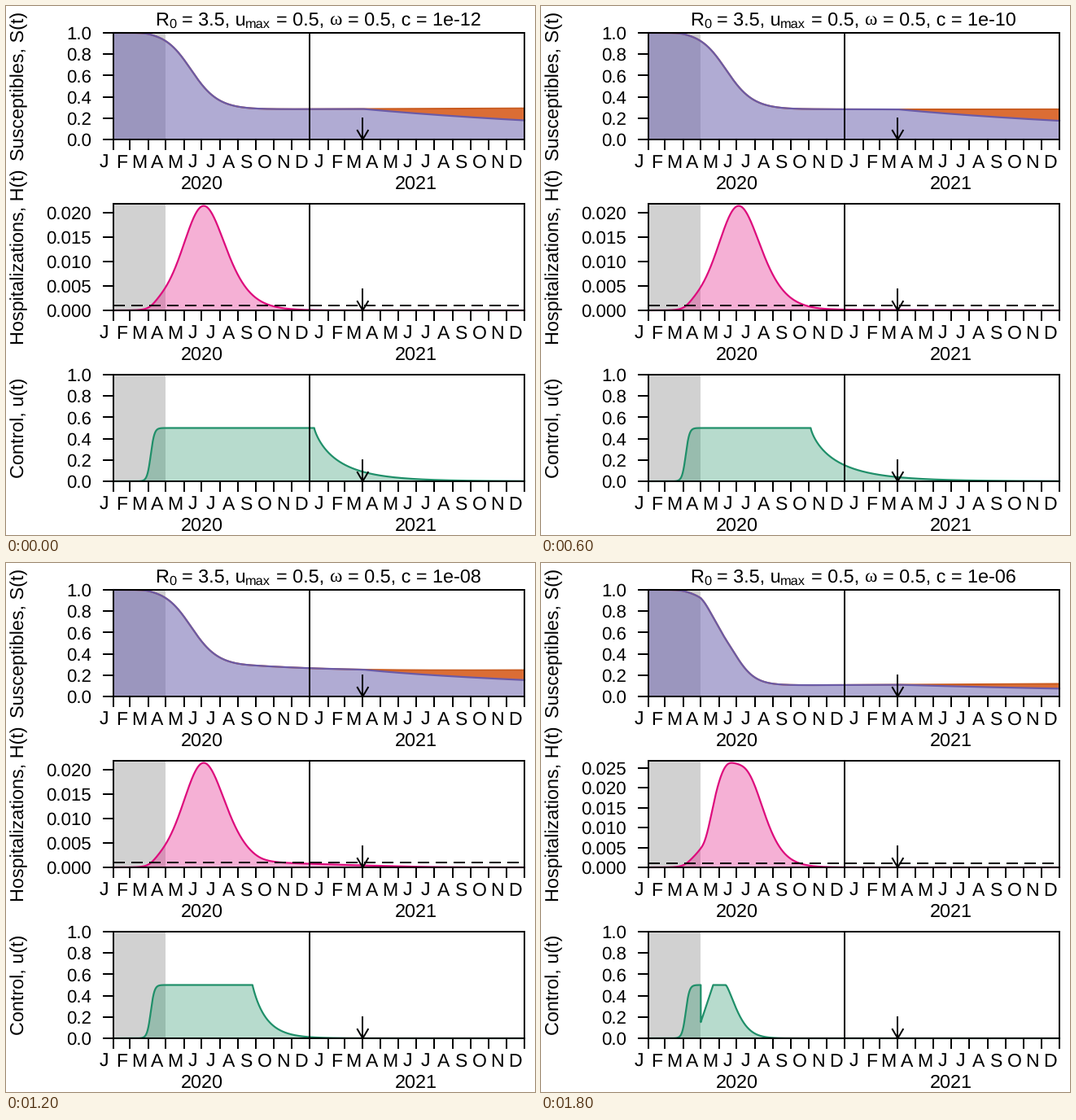
These frames come from a looping animation (650 by 650 pixels, 2.1 s). A matplotlib script:

```python
import numpy as np
import matplotlib.pyplot as plt
from matplotlib.animation import FuncAnimation
from matplotlib.patches import Rectangle

plt.rcParams["font.family"] = "Liberation Sans"
plt.rcParams["text.hinting"] = "none"

PX = 0.72                       # points per pixel at 100 dpi
LEFT, RIGHT, HEIGHT = 132, 637, 131
BOTTOMS = (164, 374, 584)
PURPLE, PINK, GREEN = "#6f66af", "#e51d87", "#219266"

MONTH_LEN = [31, 28, 31, 30, 31, 30, 31, 31, 30, 31, 30, 31] * 2
STARTS = np.cumsum([-31] + MONTH_LEN)       # day 0 is 1 February
LETTERS = "JFMAMJJASOND" * 2
LOCKDOWN, NEW_YEAR, VACCINE, DAYS = STARTS[[4, 12, 15, 24]]

# Epidemic model, rates per day
R0, U_MAX = 3.5, 0.5
LATENT, INFECTIOUS, STAY = 1 / 5, 1 / 10, 1 / 8
BIRTH, VACCINATION = 1 / (80 * 365), 0.5 / 275
PEAK_DAY, PEAK_H, LIMIT = 153.5, 0.0214, 0.001

STEP = 0.1
days = np.arange(0, DAYS + STEP / 2, STEP)

# For each cost: control after lockdown, release day, decay time, decay shape
PLANS = [(.5, 341.5, 43, .83), (.5, 308.5, 51, .82), (.5, 276, 46, .8),
         (.5, 257.5, 22, .62), (.5, 236.5, 24, .95), (.5, 199, 30, 1.05),
         (.15, 131.3, 26.5, 1.4)]


def control(restart, release, tau, shape):
    u = U_MAX / (1 + np.exp(-(days - 63.5) / 3.1))
    regain = np.minimum(restart + (days - LOCKDOWN) / 60, U_MAX)
    u = np.where(days > LOCKDOWN, np.minimum(u, regain), u)
    return u * np.exp(-(np.maximum(days - release, 0) / tau) ** shape)


def simulate(u, seed, vaccination=VACCINATION):
    """Susceptible share and unscaled hospital load under control u."""
    s, e, i, h = 1 - seed, seed, 0.0, 0.0
    track = []
    for day, contact in zip(days, R0 * INFECTIOUS * (1 - u)):
        track.append((s, h))
        new = contact * s * i
        jab = vaccination * s if day > VACCINE else 0
        s, e, i, h = (s + STEP * (BIRTH * (1 - s) - new - jab),
                      e + STEP * (new - LATENT * e),
                      i + STEP * (LATENT * e - INFECTIOUS * i),
                      h + STEP * (INFECTIOUS * i - STAY * h))
    return np.array(track).T


def calibrate(u):
    """Seed that puts the first hospital peak on PEAK_DAY, and its scale."""
    low, high = -8.0, -3.0
    for _ in range(16):
        mid = (low + high) / 2
        h = simulate(u, 10 ** mid)[1]
        if days[h.argmax()] > PEAK_DAY:
            low = mid
        else:
            high = mid
    return 10 ** mid, PEAK_H / h.max()


def solve(u):
    s, h = simulate(u, seed)
    free = simulate(u, seed, 0)[0]
    return u, s, free, h * scale


controls = [control(*plan) for plan in PLANS]
seed, scale = calibrate(controls[0])
runs = [solve(u) for u in controls]


def xpos(day):
    return LEFT + np.asarray(day) * (RIGHT - LEFT) / DAYS


fig = plt.figure(figsize=(6.5, 6.5), dpi=100, facecolor="white")
ax = fig.add_axes([0, 0, 1, 1])


def line(x, y, color="black", width=2.0, **kw):
    ax.plot(x, y, color=color, lw=width * PX, **kw)


def text(x, y, s, size=23.4, **kw):
    ax.text(x, y, s, fontsize=size * PX, va="baseline", **kw)


def curve(bottom, values, top, fill, alpha, edge):
    y = bottom - values / top * HEIGHT
    ax.fill_between(xpos(days), y, bottom, color=fill, alpha=alpha, lw=0, zorder=2)
    line(xpos(days), y, edge, 2.2, zorder=3)


def frame(bottom, label, top, ticks, fmt):
    ax.add_patch(Rectangle((LEFT, bottom - HEIGHT), xpos(LOCKDOWN) - LEFT, HEIGHT,
                           fc="#d1d1d1", lw=0, zorder=1))
    ax.add_patch(Rectangle((LEFT, bottom - HEIGHT), RIGHT - LEFT, HEIGHT,
                           fill=False, ec="black", lw=2 * PX, zorder=5))
    for v in ticks:
        y = bottom - v / top * HEIGHT
        line([LEFT - 12.5, LEFT], [y, y], zorder=5)
        text(105, y + 8, fmt % v, 22.3, ha="right")
    for day in STARTS[1:]:
        line([xpos(day)] * 2, [bottom, bottom + 12], zorder=5)
    for letter, a, b in zip(LETTERS, STARTS, STARTS[1:]):
        text(xpos((a + b) / 2), bottom + 35, letter, 23, ha="center")
    for year, july in (("2020", STARTS[6]), ("2021", STARTS[18])):
        text(xpos(july), bottom + 61, year, ha="center")
    text(22, bottom - HEIGHT / 2, label, ha="center", rotation=90, rotation_mode="anchor")

    line([xpos(NEW_YEAR)] * 2, [bottom - HEIGHT, bottom], zorder=5)
    x = xpos(VACCINE)
    line([x, x], [bottom - .2 * HEIGHT, bottom], zorder=6)
    line([x - 6.5, x, x + 6.5], [bottom - 11, bottom, bottom - 11], zorder=6)


def title(cost):
    text(183.2, 24, "R")
    text(200.1, 27, "0", 16.4)
    text(215.7, 24, "= 3.5, u")
    text(294.4, 27, "max", 16.4)
    text(331.8, 24, "= 0.5,")
    text(397.5, 24, "ω", family="Liberation Serif")
    text(420.1, 24, "= 0.5, c = " + cost)


def draw(n):
    ax.clear()
    ax.set_xlim(0, 650)
    ax.set_ylim(650, 0)
    ax.axis("off")
    title("1e-%02d" % (12 - n))
    u, s, free, h = runs[n]
    b1, b2, b3 = BOTTOMS
    fifths = np.linspace(0, 1, 6)

    # Orange gap: people spared by vaccination
    ax.fill_between(xpos(days), b1 - free * HEIGHT, b1 - s * HEIGHT,
                    color="#db6d35", lw=0, zorder=2)
    line(xpos(days), b1 - free * HEIGHT, "#c95a1e", zorder=2.5)
    curve(b1, s, 1, PURPLE, .55, "#6a5aa6")
    frame(b1, "Susceptibles, S(t)", 1, fifths, "%.1f")

    top = 1.02 * h.max()
    curve(b2, h, top, PINK, .35, "#dd0a7c")
    limit = b2 - LIMIT / top * HEIGHT
    line([LEFT, RIGHT], [limit, limit], linestyle=(0, (7, 4)), zorder=4)
    frame(b2, "Hospitalizations, H(t)", top, np.arange(0, top, .005), "%.3f")

    curve(b3, u, 1, GREEN, .32, "#1f8f69")
    frame(b3, "Control, u(t)", 1, fifths, "%.1f")
    return []


anim = FuncAnimation(fig, draw, frames=len(PLANS), interval=300, repeat=True, repeat_delay=0)
plt.show()
```
